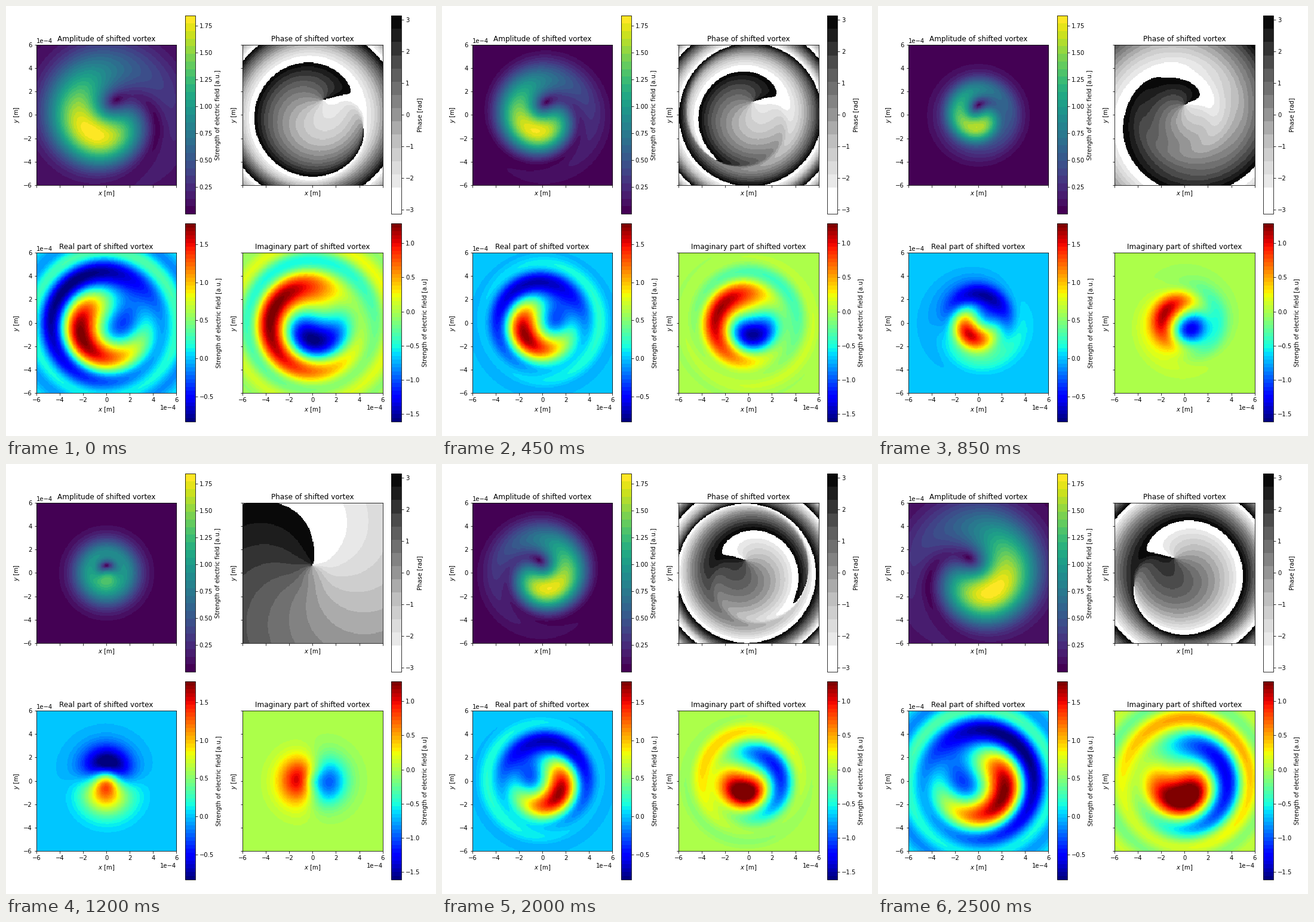
Recreate the animation shown at these times as a matplotlib script. Size 720 by 720 pixels, loop 2550 ms.

```python
import numpy as np
import matplotlib.pyplot as plt
from matplotlib.animation import FuncAnimation
from matplotlib.colors import ListedColormap

SIZE, DPI = 720, 72
FRAMES, INTERVAL = 51, 50
HALF = 6e-4           # half width of the window [m]
W_GAUSS = 1e-4        # waist of the plain Gaussian beam [m]
W_VORTEX = 2e-4       # waist of the vortex beam [m]
WAVELENGTH = 633e-9
Z_MAX = 0.25

plt.rcParams["font.family"] = "DejaVu Sans"

axis = np.linspace(-HALF, HALF, 200)
X, Y = np.meshgrid(axis, axis)
R = np.hypot(X, Y)
SPIRAL = np.exp(-1j * (np.arctan2(Y, X) + np.pi / 2))


def beam(z, waist, charge):
    """Gaussian (charge 0) or vortex (charge 1) mode with unit peak."""
    s = z * WAVELENGTH / (np.pi * waist**2)
    w2 = waist**2 * (1 + s**2)
    phase = s * R**2 / w2 - (charge + 1) * np.arctan(s)
    mode = np.exp(-R**2 / w2 + 1j * phase)
    if charge:
        mode = mode * np.sqrt(2 * np.e / w2) * R * SPIRAL
    return mode


def field(n):
    z = Z_MAX * (1 - 2 * n / (FRAMES - 1))
    return beam(z, W_GAUSS, 0) + beam(z, W_VORTEX, 1)


def grey_bands(count):
    colors = plt.get_cmap("Greys")((np.arange(count) + 0.5) / count)
    colors[:2] = 1
    return ListedColormap(colors)


def place(x0, y0, x1, y1):
    """Axes from pixel corners counted from the top left."""
    return fig.add_axes([x0 / SIZE, 1 - y1 / SIZE,
                         (x1 - x0) / SIZE, (y1 - y0) / SIZE])


STRENGTH = "Strength of electric field [a.u.]"
# title, part of the field, colours, value range, colour bar label
PANELS = [
    ("Amplitude", np.abs, plt.get_cmap("viridis", 26), (0.0005, 1.844), STRENGTH),
    ("Phase", np.angle, grey_bands(15), (-3.135, 3.135), "Phase [rad]"),
    ("Real part", np.real, plt.get_cmap("jet", 51), (-0.828, 1.768), STRENGTH),
    ("Imaginary part", np.imag, plt.get_cmap("jet", 51), (-1.617, 1.288),
     "Strength of electric field [a.u]"),
]

fig = plt.figure(figsize=(SIZE / DPI, SIZE / DPI), dpi=DPI, facecolor="white")
ticks = np.arange(-6, 7, 2) * 1e-4
images = []

for i, (name, part, cmap, (low, high), label) in enumerate(PANELS):
    row, col = divmod(i, 2)
    dx, dy = 345.2 * col, 348.1 * row
    ax = place(50.9 + dx, 65.2 + dy, 285.4 + dx, 299.7 + dy)
    image = ax.imshow(part(field(0)), cmap=cmap, vmin=low, vmax=high,
                      origin="lower", extent=[-HALF, HALF, -HALF, HALF],
                      interpolation="nearest", aspect="auto")
    images.append((image, part))

    ax.set_title(name + " of shifted vortex")
    ax.set_xlabel("$x$ [m]")
    ax.set_ylabel("$y$ [m]")
    ax.set_xticks(ticks)
    ax.set_yticks(ticks)
    ax.ticklabel_format(style="sci", scilimits=(0, 0))
    ax.tick_params(labelbottom=row == 1, labelleft=col == 0)
    ax.xaxis.get_offset_text().set_visible(row == 1)
    ax.yaxis.get_offset_text().set_visible(col == 0)

    cax = place(300.2 + dx, 16.2 + dy, 316.8 + dx, 348.2 + dy)
    fig.colorbar(image, cax=cax, label=label)


def update(n):
    e = field(n)
    for image, part in images:
        image.set_data(part(e))
    return [image for image, _ in images]


anim = FuncAnimation(fig, update, frames=FRAMES, interval=INTERVAL,
                     repeat=True, repeat_delay=0, blit=False)
plt.show()
```
